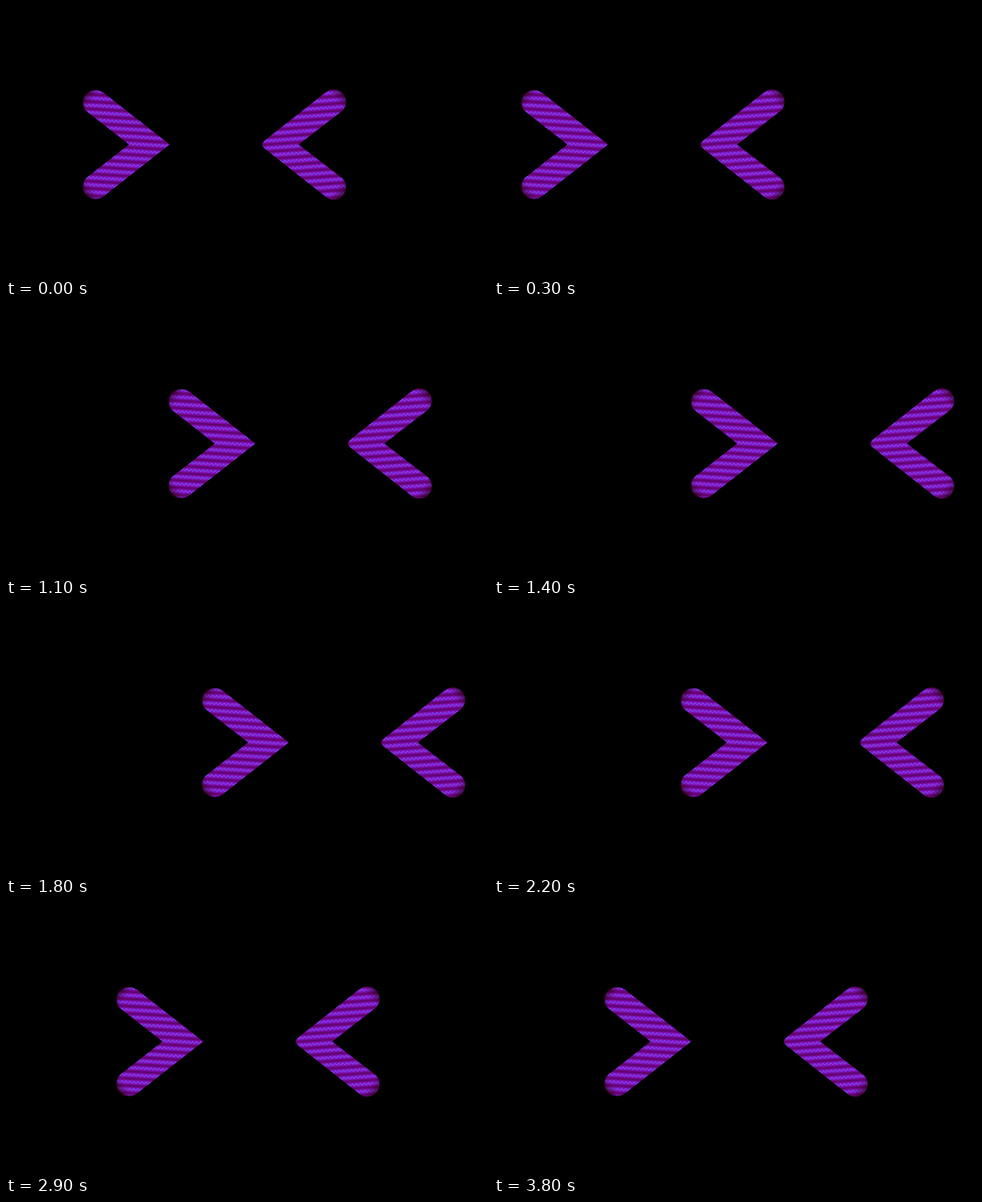
An HTML page for the animation above (4000 ms loop, 600 px wide and 338 px high).

```html
<!DOCTYPE html>
<html lang="en">
<head>
<meta charset="utf-8">
<title>Squinting eyes</title>
<style>
  html, body { margin: 0; width: 100%; height: 100%; overflow: hidden; background: #000; }
  svg { display: block; width: 100%; height: 100%; }
</style>
</head>
<body>
<svg viewBox="0 0 600 338">
  <defs>
    <!-- Woven LED bands with staggered dots, tilted differently on each side -->
    <pattern id="weaveL" width="5" height="9" patternUnits="userSpaceOnUse" patternTransform="translate(225.6 97.7) rotate(3.4)">
      <rect width="5" height="9" fill="#70058a"/>
      <rect y="1" width="5" height="5.6" fill="#8009ae"/>
      <rect y="2" width="5" height="3.4" fill="#8014c4"/>
      <rect y="7.4" width="5" height="1.6" fill="#5e0464"/>
      <ellipse cx="1.3" cy="2.9" rx="1.1" ry=".8" fill="#7c60f6"/>
      <ellipse cx="3.8" cy="4.5" rx="1.1" ry=".8" fill="#7c60f6"/>
    </pattern>
    <pattern id="weaveR" href="#weaveL" patternTransform="translate(136 108.5) rotate(-4)"/>
    <linearGradient id="fade" x1=".1" y1=".14" x2=".45" y2=".4">
      <stop offset="0" stop-color="#200008" stop-opacity=".75"/>
      <stop offset="1" stop-color="#3a0030" stop-opacity="0"/>
    </linearGradient>
  </defs>
  <g id="eyes">
    <path fill="url(#weaveL)" d="M163 108 L245.5 172.8 L163 237.6 A15.8 15.8 0 0 1 141.7 214.6 L195 172.8 L141.7 131 A15.8 15.8 0 0 1 163 108Z"/>
    <path fill="url(#weaveR)" d="M440 107.6 L363.5 168 Q358 172.8 363.5 177.6 L440 238 A15.4 15.4 0 0 0 460 214.6 L406 172.8 L460 131 A15.4 15.4 0 0 0 440 107.6Z"/>
    <g fill="url(#fade)">
      <circle r="15.6" transform="translate(152 119.4)"/>
      <circle r="15.6" transform="translate(152 226.2) scale(1 -1)"/>
      <circle r="15.6" transform="translate(450 119.4) scale(-1 1)"/>
      <circle r="15.6" transform="translate(450 226.2) scale(-1 -1)"/>
    </g>
  </g>
</svg>
<script>
  const LOOP = 4000, STEP = 100;
  const eyes = document.getElementById('eyes');

  // The eyes' shift is the sum of these moves
  const moves = [
    { at: -120, lasts: 420, by: -103.5 },  // glance left, already under way
    { at: 510, lasts: 1170, by: 216 },     // sweep right
    { at: 1600, lasts: 800, by: -18 },     // drift back
    { at: 2200, lasts: 395, by: -104 },    // snap past the middle
    { at: 2560, lasts: 400, by: 9.5 }      // settle
  ];

  // Smooth start and a longer, softer stop
  function ease(u) {
    const w = 1 - (1 - Math.min(1, Math.max(0, u))) ** 1.7;
    return w * w * (3 - 2 * w);
  }

  const shiftAt = t => moves.reduce((x, m) => x + m.by * ease((t - m.at) / m.lasts), 0);

  function draw(ms) {
    const t = Math.floor(ms % LOOP / STEP) * STEP;
    eyes.setAttribute('transform', `translate(${shiftAt(t).toFixed(2)} 0)`);
  }

  let start;
  function tick(now) {
    start ??= now;
    draw(now - start);
    requestAnimationFrame(tick);
  }
  draw(0);
  requestAnimationFrame(tick);
</script>
</body>
</html>
```
